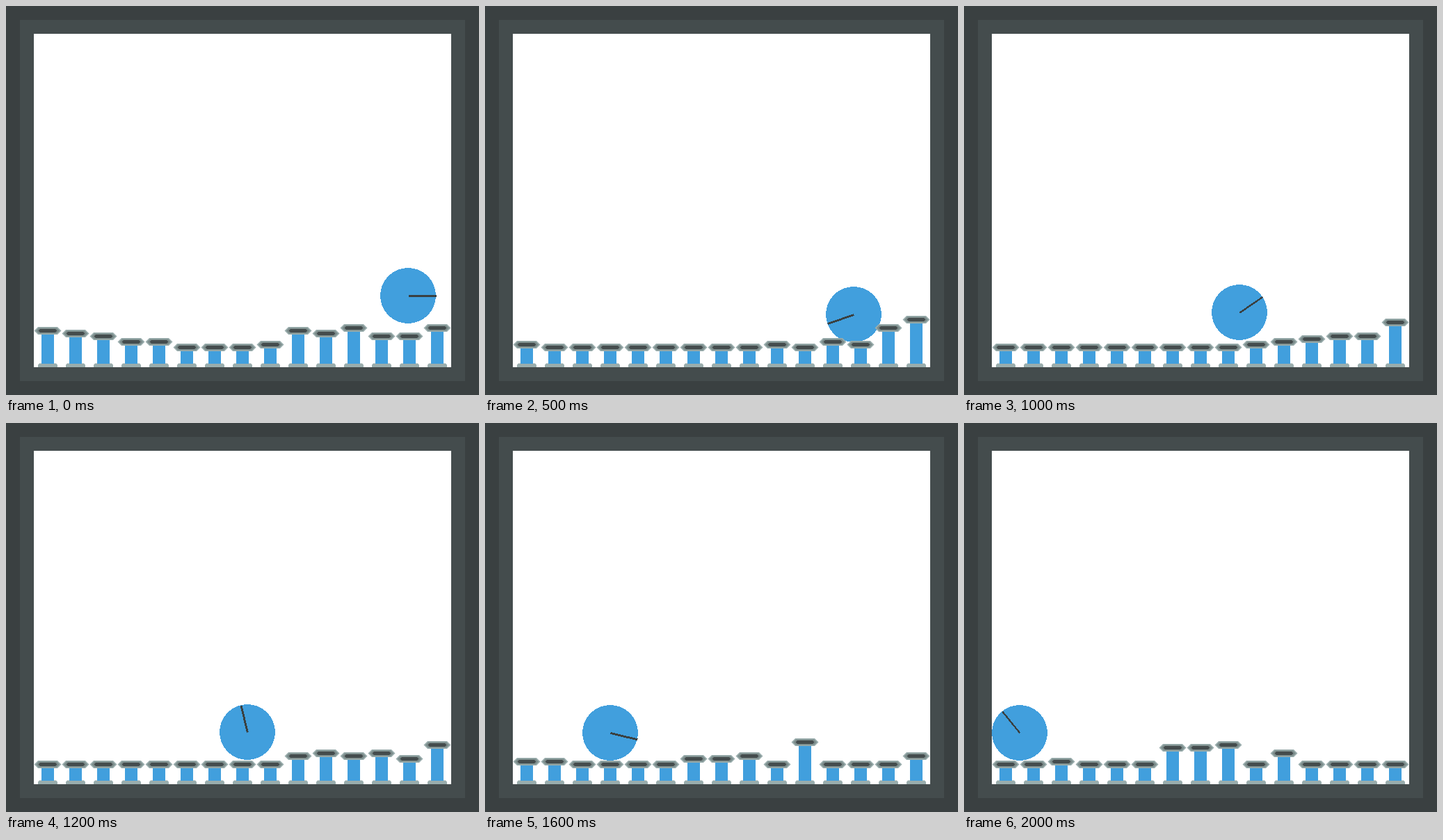
Recreate the animation shown at these times as an HTML page. Size 680 px wide and 560 px high, loop 2100 ms.

```html
<!DOCTYPE html>
<html lang="en">
<head>
<meta charset="utf-8">
<title>Ball on pistons</title>
<style>
  html, body { margin: 0; width: 100%; height: 100%; overflow: hidden; background: #3a4041; }
  svg { display: block; }
</style>
</head>
<body>
<svg id="stage" width="680" height="560" viewBox="0 0 680 560">
  <g shape-rendering="crispEdges">
    <rect width="680" height="560" fill="#3a4041"/>
    <rect x="20" y="20" width="640" height="520" fill="#444c4d"/>
    <rect x="40" y="40" width="600" height="480" fill="#fff"/>
  </g>
  <g id="bases" fill="#9aadad"></g>
  <g id="rods" fill="#419fdd" shape-rendering="crispEdges"></g>
  <g shape-rendering="crispEdges">
    <circle id="ball" r="40" fill="#419fdd"/>
    <line id="spoke" stroke="#3a4041"/>
  </g>
  <g id="heads"></g>
</svg>
<script>
const STEP = 100, COUNT = 21, REST = 486, LIFT = 4, RADIUS = 40, DIP = 10;

// Start height, then the first and last step on which the piston rises.
// Otherwise it sinks one notch per step, down to zero.
const PISTONS = [
  [6, 16, 16], [5, 16, 16], [4, 20, 20], [2], [2], [0], [0, 15, 20], [0, 15, 20],
  [1, 14, 20], [6, 8, 12], [5, 7, 16], [7, 7, 11], [4, 5, 11], [4, 2, 6], [7, 2, 7]
];

// Key poses of the ball: it drops, rolls over the bumps and meets the left wall.
const POSES = [
  { at: 0, x: 578, y: 417, turn: 0 },
  { at: 2, x: 567, y: 432, turn: -153 },
  { at: 5, x: 530, y: 444, turn: -199 },
  { at: 8, x: 441, y: 438, turn: -330 },
  { at: 12, x: 347, y: 445, turn: -464 },
  { at: 16, x: 180, y: 446, turn: -706.5 },
  { at: 20, x: 80, y: 446, turn: -849 }
];

function height([start, first, last], step) {
  let level = start;
  for (let s = 1; s <= step; s++) {
    const rising = s >= first && s <= last && s !== DIP;
    level = Math.max(0, level + (rising ? 1 : -1));
  }
  return level;
}

function slope(key, i) {
  const a = POSES[i], b = POSES[i + 1];
  return (b[key] - a[key]) / (b.at - a.at);
}

// Harmonic mean of the neighbouring slopes, so the curve never overshoots.
function tangent(key, i) {
  if (i === 0) return slope(key, 0);
  if (i === POSES.length - 1) return slope(key, i - 1);
  const m = slope(key, i - 1), n = slope(key, i);
  return m * n > 0 ? 2 * m * n / (m + n) : 0;
}

function glide(key, step) {
  let i = 0;
  while (i < POSES.length - 2 && step >= POSES[i + 1].at) i++;
  const a = POSES[i], b = POSES[i + 1], span = b.at - a.at;
  const u = (step - a.at) / span, v = 1 - u;
  return a[key] * v * v * (1 + 2 * u) + b[key] * u * u * (1 + 2 * v)
    + span * u * v * (tangent(key, i) * v - tangent(key, i + 1) * u);
}

const byId = id => document.getElementById(id);

function set(node, attrs) {
  for (const key in attrs) node.setAttribute(key, attrs[key]);
  return node;
}

function add(parent, tag, attrs) {
  const node = document.createElementNS("http://www.w3.org/2000/svg", tag);
  return parent.appendChild(set(node, attrs));
}

// A flat hexagon, centred in the 40 by 11 head.
function hexagon(inset, rise, slant) {
  const right = 40 - inset, top = 5.5 - rise, bottom = 5.5 + rise;
  return `M${inset} 5.5 ${inset + slant} ${top}H${right - slant}` +
    `L${right} 5.5 ${right - slant} ${bottom}H${inset + slant}Z`;
}

function addHead() {
  const head = add(byId("heads"), "g", {});
  add(head, "path", { d: hexagon(0.5, 5.5, 5.5), fill: "#9aadad" });
  add(head, "path", { d: hexagon(3, 4, 4), fill: "#7d8d8c" });
  add(head, "path", { d: hexagon(6.5, 2.5, 2.5), fill: "#444c4d" });
  return head;
}

const pistons = PISTONS.map((plan, i) => {
  const x = 40 + i * 40;
  add(byId("bases"), "path", {
    d: `M${x + 6} 520V516.5L${x + 8} 514.5H${x + 32}L${x + 34} 516.5V520Z`
  });
  return {
    x, plan,
    rod: add(byId("rods"), "rect", { x: x + 11, width: 18 }),
    head: addHead()
  };
});

function draw(step) {
  for (const { x, plan, rod, head } of pistons) {
    const top = REST - LIFT * height(plan, step);
    set(rod, { y: top + 6, height: 509 - top });
    set(head, { transform: `translate(${x} ${top})` });
  }
  const cx = Math.round(glide("x", step)), cy = Math.round(glide("y", step));
  const angle = glide("turn", step) * Math.PI / 180;
  const cos = Math.cos(angle), sin = Math.sin(angle);
  set(byId("ball"), { cx, cy });
  set(byId("spoke"), {
    x1: cx + 0.5, y1: cy + 0.5,
    x2: cx + 0.5 + RADIUS * cos, y2: cy + 0.5 + RADIUS * sin,
    "stroke-width": 3 * Math.max(Math.abs(cos), Math.abs(sin))
  });
}

const begin = performance.now();
let shown = 0;

function tick() {
  const step = Math.floor((performance.now() - begin) / STEP) % COUNT;
  if (step !== shown) draw(shown = step);
  requestAnimationFrame(tick);
}

draw(0);
requestAnimationFrame(tick);
</script>
</body>
</html>
```
